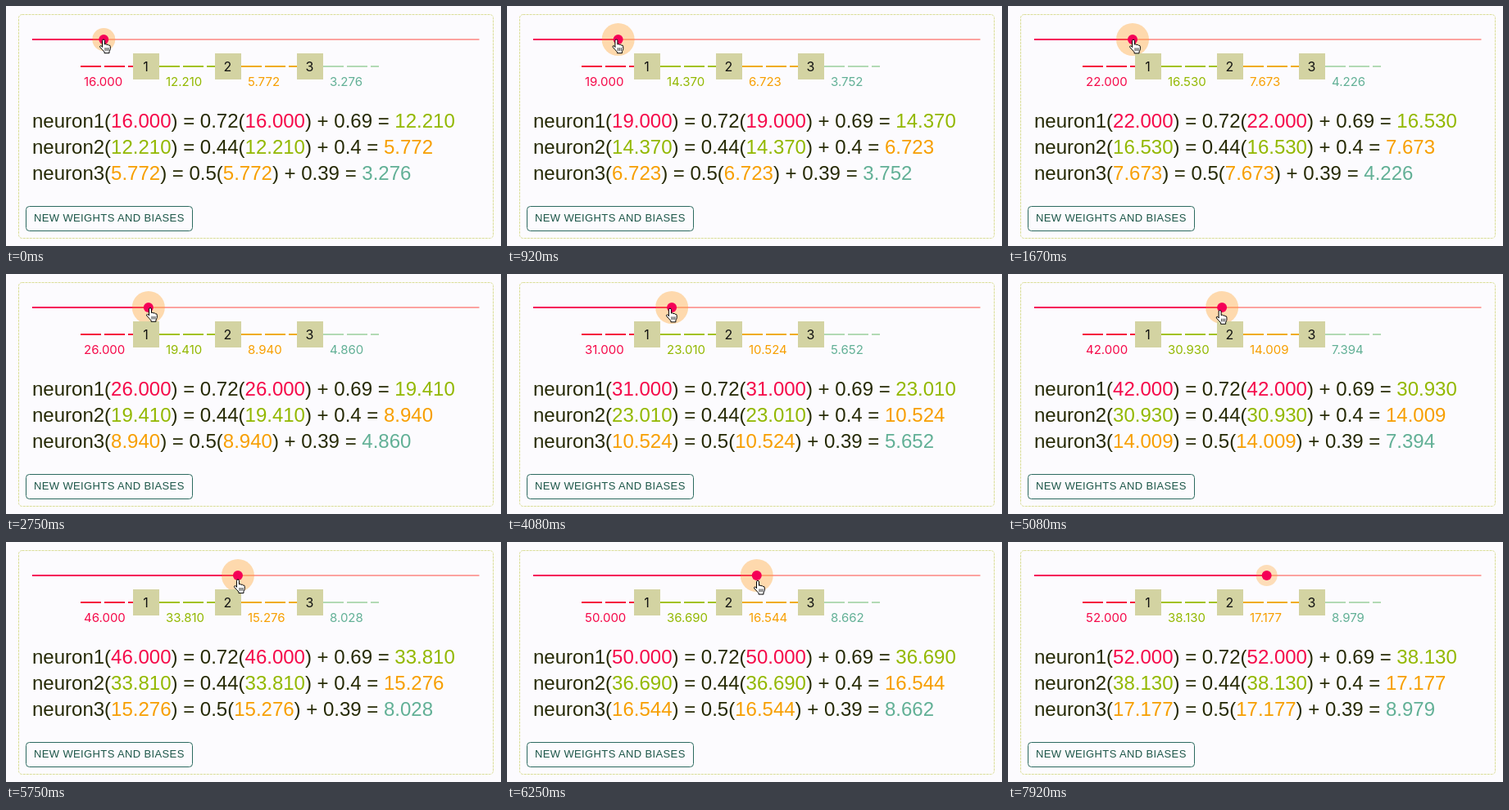
An HTML page that plays this animation: 604x294 px, repeating every 8010 ms.

```html
<!DOCTYPE html>
<html lang="en">
<head>
<meta charset="utf-8">
<title>Neuron chain</title>
<style>
  html, body { margin: 0; width: 100%; height: 100%; overflow: hidden; background: #fcfbfe; }
  svg { display: block; font: 24px "Liberation Sans", Arial, sans-serif; fill: #262a04; }
  #chain { font: 16px Inter, sans-serif; fill: #111; text-anchor: middle; }
  #labels { font: 15px Inter, sans-serif; }
  .button { font-size: 13px; letter-spacing: .371px; fill: #1c5648; }
</style>
</head>
<body>
<svg width="604" height="294" viewBox="0 0 604 294">
  <rect x="15.5" y="10.5" width="579" height="274" rx="4" fill="none" stroke="#dade98" stroke-dasharray="3 1"/>
  <path d="M32 41H577.5" stroke="#fda3a0" stroke-width="2"/>
  <path id="track" stroke="#f50057" stroke-width="2"/>
  <circle id="halo" cy="41" fill="#ffa532"/>
  <circle id="thumb" cy="41" r="6" fill="#f50057"/>
  <g id="chain"></g>
  <g id="labels"></g>
  <g id="lines"></g>
  <rect x="24.5" y="245.5" width="203" height="30" rx="4" fill="none" stroke="#2c6a60"/>
  <text class="button" x="34" y="264">NEW WEIGHTS AND BIASES</text>
  <g id="hand" stroke="#000" stroke-linecap="round" stroke-linejoin="round">
    <path fill="#fff" d="M4 9.500V2a1.500 1.500 0 0 1 3 0V6.500q1.500-1 2.500.4q1.600-.6 2.300.7q2-.4 2 1.600v3q-.3 1.500-1.300 3v2H6.500v-1.500Q4.500 13.500 1.300 10q-.8-1.500.7-1.800q1 0 2 1.300z"/>
    <path fill="none" stroke-width=".8" d="M7.500 11v3M9.500 11v3M11.500 11v3"/>
  </g>
</svg>
<script>
const LOOP = 8010, LEFT = 32, UNIT = 5.455, GRAB = 119, DROP = 315;
const colors = ['#f50a4a', '#93b800', '#f79f00', '#62b096'];
const strokes = ['#f50a3c', '#a3c21a', '#f0ac14', '#b2dab4'];
const layers = [[0.72, 0.69], [0.44, 0.4], [0.5, 0.39]];
// first tick, last tick (1/12 s), pointer x reached
const drags = [[4, 12, 135], [13, 25, 165], [29, 33, 176], [43, 65, 273], [66, 75, 306], [76, 78, DROP]];

const $ = id => document.getElementById(id);
const set = (id, attrs) => {
  for (const name in attrs) $(id).setAttribute(name, attrs[name]);
};

// 0 to 1 between two ticks, slightly slower at both ends
function ramp(tick, from, to) {
  const p = Math.min(1, Math.max(0, (tick - from) / (to - from)));
  return p - .037 * Math.sin(2 * Math.PI * p);
}

$('chain').innerHTML = strokes.map((color, i) => {
  const x = i ? 87 + 100 * i : 91, end = 155 + 100 * i;
  const wire = `<path d="M${x} 74H${end}" stroke="${color}" stroke-width="2" stroke-dasharray="25 4"/>`;
  const box = `<rect x="${end}" y="58" width="32" height="32" fill="#d3d3a2"/>
    <text x="${end + 15.5}" y="80">${i + 1}</text>`;
  return i < 3 ? wire + box : wire;
}).join('');

function showValue(v) {
  const text = [v.toFixed(3)];
  layers.forEach(([w, b], i) => text.push((text[i] * w + b).toFixed(3)));
  const tint = i => `<tspan fill="${colors[i]}">${text[i]}</tspan>`;
  $('labels').innerHTML = text.map((s, i) =>
    `<text x="${95 + 100 * i}" y="98" fill="${colors[i]}">${s}</text>`).join('');
  $('lines').innerHTML = layers.map(([w, b], i) =>
    `<text x="32" y="${149 + 32 * i}">neuron${i + 1}(${tint(i)}) = ${w}(${tint(i)}) + ${b} = ${tint(i + 1)}</text>`).join('');
  const x = LEFT + v * UNIT;
  set('track', { d: `M${LEFT} 41H${x}` });
  set('thumb', { cx: x });
  set('halo', { cx: x });
}

let shown;
function draw(now) {
  const t = Math.floor(now % LOOP / 10) * 10;
  const tick = Math.floor(t * .012 + .04);
  const x = drags.reduce((x, [from, to, end]) => x + (end - x) * ramp(tick, from, to), GRAB);
  const y = 41 + 7 * ((x - GRAB) / (DROP - GRAB)) ** 2;
  const value = Math.round((x - LEFT) / UNIT);
  if (value !== shown) showValue(shown = value);

  const fade = ramp(tick, 94, 95);
  set('halo', {
    r: 14 + 6 * ramp(tick, 4, 6) - 6 * ramp(tick, 80, 82) - fade,
    opacity: .4 - .06 * fade
  });
  const away = ramp(tick, 80, 83), exit = ramp(tick, 84, 87);
  const handX = x + 147 * away + 50 * exit, handY = y + 197 * away + 65 * exit;
  set('hand', { transform: `translate(${handX - 5.5} ${handY - .5})` });
  requestAnimationFrame(draw);
}
draw(performance.now());
</script>
</body>
</html>
```
